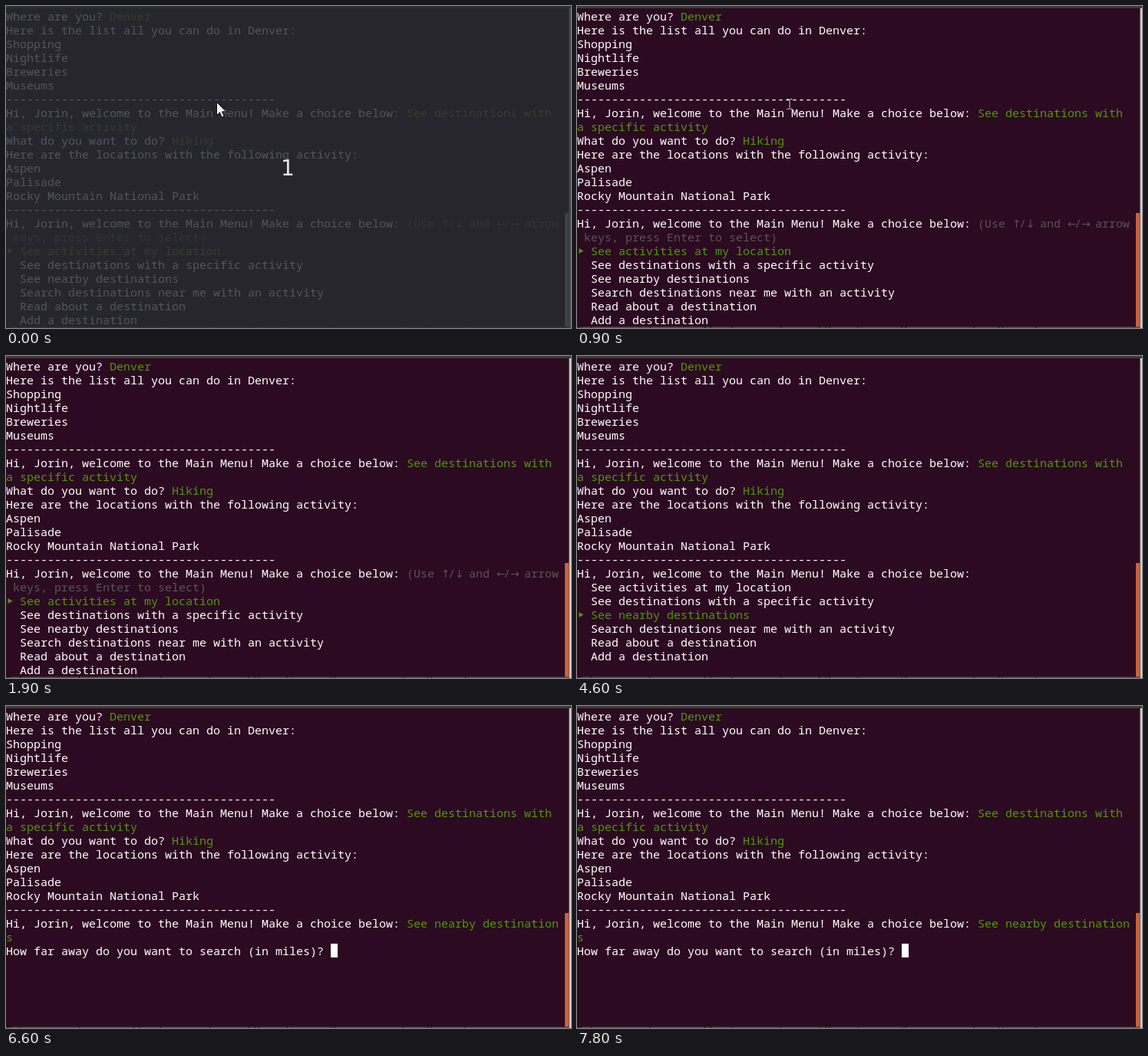
These frames come from a looping animation (736 px wide and 420 px high, 8 s). An HTML page:

```html
<!DOCTYPE html>
<html lang="en">
<head>
<meta charset="utf-8">
<title>Travel menu in a terminal</title>
<style>
  html, body { margin: 0; width: 100%; height: 100%; overflow: hidden; background: #2c0a21; }
  svg { display: block; width: 736px; height: 420px; }
  text { white-space: pre; fill: #fff; font: 15px "Noto Sans Mono", "DejaVu Sans Mono", monospace; }
  .green { fill: #4e9a06; }
  .hint { fill: #555753; }
  .arrow { font: 14px "DejaVu Sans", sans-serif; }
  .page { fill: #1a1418; font: 14px "Noto Sans", sans-serif; }
  .count { fill: #e4e4e6; font: 28px "DejaVu Sans", sans-serif; }

  .step { animation: 8s step-end infinite; visibility: hidden; }
  #first { animation-name: first; }
  #second { animation-name: second; }
  #third { animation-name: third; }
  #ask { animation-name: ask; }
  #cursor { animation-name: blink; }
  #dim { animation-name: dim; }
  #beam { animation-name: beam; }
  #thumb { animation: thumb 8s step-end infinite; }
  @keyframes first { 0% { visibility: visible } 25%, 100% { visibility: hidden } }
  @keyframes second { 0% { visibility: hidden } 25% { visibility: visible } 57.5%, 100% { visibility: hidden } }
  @keyframes third { 0% { visibility: hidden } 57.5% { visibility: visible } 82.5%, 100% { visibility: hidden } }
  @keyframes ask { 0% { visibility: hidden } 82.5%, 100% { visibility: visible } }
  @keyframes blink { 0% { visibility: hidden } 82.5% { visibility: visible } 90% { visibility: hidden } 97.5%, 100% { visibility: visible } }
  @keyframes dim { 0% { visibility: visible } 6.25%, 100% { visibility: hidden } }
  @keyframes beam { 0% { visibility: hidden } 6.25% { visibility: visible } 23.75%, 100% { visibility: hidden } }
  @keyframes thumb { 0% { fill: #a39ca0 } 10% { fill: #b5806c } 11.25%, 100% { fill: #c9623c } }
</style>
</head>
<body>
<svg viewBox="0 0 736 420">
  <rect width="736" height="420" fill="#2c0a21"/>
  <rect width="736" height="3" fill="#3c3b37"/>
  <rect x="733" y="3" width="3" height="417" fill="#d3d0cf"/>
  <rect x="733" y="3" width="1" height="417" fill="#6c6066"/>
  <rect y="418.5" width="733" height="1.5" fill="#5b4d55"/>
  <text class="page" x="0" y="428">Enter a current command line to connect, one of the options on the screen, or type the next</text>
  <rect id="thumb" x="728" y="270" width="5" height="148.5"/>

  <g id="log"></g>
  <g id="first" class="step"></g>
  <g id="second" class="step"></g>
  <g id="third" class="step"></g>
  <g id="ask" class="step"></g>
  <rect id="cursor" class="step" x="423" y="310" width="9" height="18" fill="#fff"/>

  <path id="beam" class="step" d="M273.5 121.5h2.5l1 1 1-1h2.5M277 122.5v11M273.5 134.5h2.5l1-1 1 1h2.5" fill="none" stroke="#d8d4d6"/>
  <g id="dim" class="step">
    <rect width="736" height="420" fill="#262c31" fill-opacity=".8"/>
    <path d="M274.5 125.5v17l4-3.7 2.7 6.2 2.8-1.2-2.7-6h5.3z" fill="#fff" stroke="#111"/>
    <text class="count" x="358" y="221">1</text>
  </g>
</svg>
<script>
  const CELL = 9, LINE = 18, BASE = 19;
  const greeting = 'Hi, Jorin, welcome to the Main Menu! Make a choice below:';
  const rule = '-'.repeat(39);
  const options = [
    'See activities at my location',
    'See destinations with a specific activity',
    'See nearby destinations',
    'Search destinations near me with an activity',
    'Read about a destination',
    'Add a destination'
  ];

  const put = (id, markup) =>
    document.getElementById(id).insertAdjacentHTML('beforeend', markup);

  const say = (id, row, text, col = 0, cls = '') =>
    put(id, `<text class="${cls}" x="${col * CELL}" y="${BASE + row * LINE}">${text}</text>`);

  function menu(id, top, active) {
    say(id, 15, greeting);
    options.forEach((label, i) => say(id, top + i, label, 2, i === active ? 'green' : ''));
    const y = (top + active) * LINE + 10;
    put(id, `<path class="green" d="M2.5 ${y}l6 3.5-6 3.5z"/>`);
  }

  [
    'Where are you?', 'Here is the list all you can do in Denver:',
    'Shopping', 'Nightlife', 'Breweries', 'Museums', rule, greeting, '',
    'What do you want to do?', 'Here are the locations with the following activity:',
    'Aspen', 'Palisade', 'Rocky Mountain National Park', rule
  ].forEach((line, row) => say('log', row, line));
  say('log', 0, 'Denver', 15, 'green');
  say('log', 7, 'See destinations with', 58, 'green');
  say('log', 8, 'a specific activity', 0, 'green');
  say('log', 9, 'Hiking', 24, 'green');

  menu('first', 17, 0);
  say('first', 15, '(Use  /  and  /  arrow', 58, 'hint');
  [['↑', 63], ['↓', 65], ['←', 71], ['→', 73]]
    .forEach(([sign, col]) => say('first', 15, sign, col, 'hint arrow'));
  say('first', 16, 'keys, press Enter to select)', 1, 'hint');

  menu('second', 16, 1);
  menu('third', 16, 2);

  say('ask', 15, greeting);
  say('ask', 15, 'See nearby destination', 58, 'green');
  say('ask', 16, 's', 0, 'green');
  say('ask', 17, 'How far away do you want to search (in miles)?');
</script>
</body>
</html>
```
